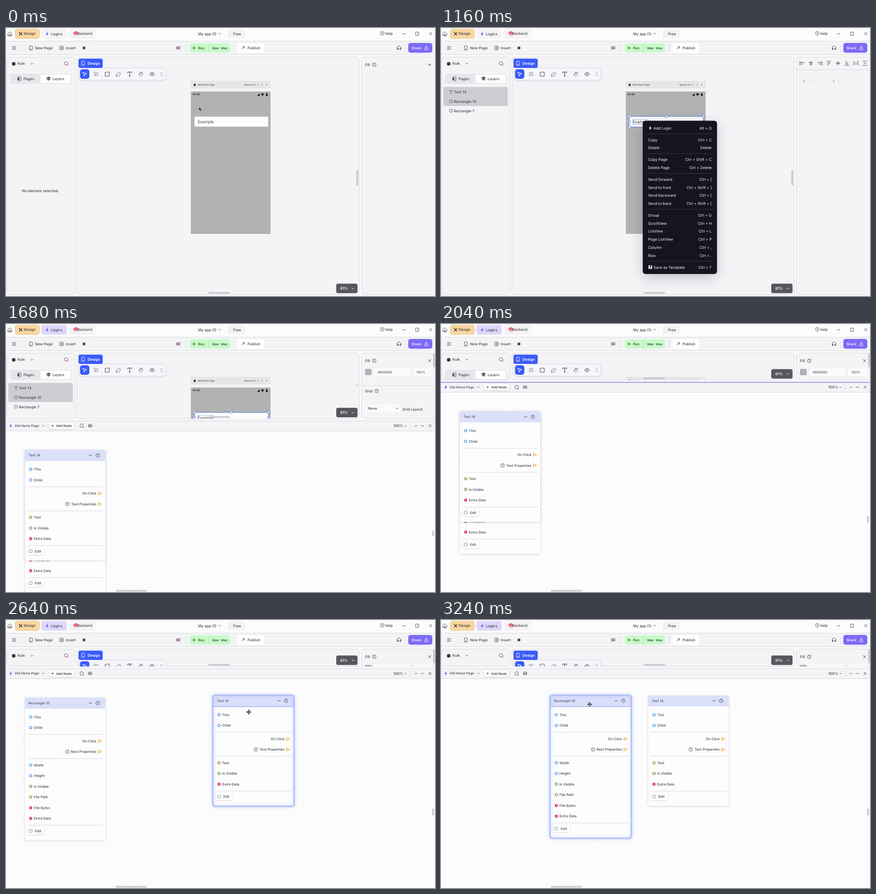
An HTML page for the animation above (3.28 s loop, 947 px wide and 591 px high).

```html
<!DOCTYPE html>
<html lang="en">
<head>
<meta charset="utf-8">
<title>App builder</title>
<style>
html, body { margin: 0; width: 100%; height: 100%; overflow: hidden; background: #fcfcfd; }
svg { display: block; font-family: Inter, "Open Sans", sans-serif; text-rendering: geometricPrecision; }
text { white-space: pre; }
.lift { filter: drop-shadow(0 1px 2px rgba(60, 60, 90, .18)); }
.glow { filter: drop-shadow(0 0 3px rgba(120, 150, 255, .6)); }
.menu { filter: drop-shadow(0 8px 14px rgba(20, 20, 40, .22)); }
</style>
</head>
<body>
<svg id="stage" width="947" height="591" viewBox="0 0 947 591"></svg>
<script>
const LOOP = 3280, STEP = 40;
const INK = '#46464c', BLUE = '#3b5bfb', LINE = '#d2d2d8', PANEL = '#f4f4f7';

// Drawing helpers; text is placed by the middle of its capitals.
const T = (x, y, s, z = 8.1, w = 500, c = INK, a = 'start') =>
  `<text x="${x}" y="${y + z * .364}" font-size="${z}" font-weight="${w}" fill="${c}" text-anchor="${a}">${s}</text>`;
const R = (x, y, w, h, r = 0, f = 'none', s = 'none', sw = 1, more = '') =>
  `<rect x="${x}" y="${y}" width="${w}" height="${h}" rx="${r}" fill="${f}" stroke="${s}" stroke-width="${sw}" ${more}/>`;
const C = (x, y, r, f = 'none', s = 'none', sw = 1) =>
  `<circle cx="${x}" cy="${y}" r="${r}" fill="${f}" stroke="${s}" stroke-width="${sw}"/>`;
const P = (d, s = INK, w = 1, f = 'none') =>
  `<path d="${d}" fill="${f}" stroke="${s}" stroke-width="${w}" stroke-linejoin="round" stroke-linecap="round"/>`;
const G = (id, body, more = '') => `<g id="${id}" ${more}>${body}</g>`;
const at = (x, y, body) => `<g transform="translate(${x} ${y})">${body}</g>`;

// Icons
const help = (x, y) => C(x, y, 4, 'none', INK, .9) + T(x, y, '?', 6, 600, INK, 'middle');
const chevron = (x, y, c = INK, k = 2.3) => P(`M${x - k} ${y - k / 2}l${k} ${k} ${k} ${-k}`, c);
const cross = (x, y, k = 2.8) => P(`M${x - k} ${y - k}l${2 * k} ${2 * k}m0 ${-2 * k}l${-2 * k} ${2 * k}`);
const plus = (x, y, k = 2.8, w = 1) => P(`M${x - k} ${y}h${2 * k}M${x} ${y - k}v${2 * k}`, INK, w);
const search = (x, y) => C(x - .3, y - .3, 3.8, 'none', INK, .9) + P(`M${x + 2.6} ${y + 2.6}l1.8 1.8`);
const bolt = (x, y, c) => P(`M${x + .8} ${y - 4}l-3.6 4.8h2.4l-.6 3.4 3.6-4.8h-2.4z`, c, .4, c);
const phone = (x, y, c = INK) => R(x - 3.2, y - 4.6, 6.4, 9.2, 1.3, 'none', c) + P(`M${x - 1} ${y + 2.8}h2`, c, .8);
const dots = (x, y) => [-2.5, 0, 2.5].map(d => C(x + d, y, .85, INK)).join('');
const bug = (x, y) => P(`M${x - 2} ${y - 2.4}q2-3 4 0v3.4q-2 4.4-4 0zM${x - 4} ${y - 3}l2 1.2M${x + 4} ${y - 3}l-2 1.2M${x - 4.4} ${y}h2.4m4.8 0h2.4M${x - 4} ${y + 3.2}l2-1.4m6 1.4l-2-1.4M${x - 1.5} ${y}h3`, INK, 1);
const vline = (x, y, h) => P(`M${x} ${y}v${h}`, LINE, .9);
const hline = (x, y, w) => P(`M${x} ${y}h${w}`, LINE, .9);

function topBars() {
  return P('M4.5 12l4-4 4 4v5.2h-8zM7.3 17v-3h2.4v3') +
    R(20, 2, 54, 21.5, 5, '#f9d7a3', '#edcb94', .9) +
    P('M29.5 10l5.6 5.4M35.2 9.8l-5.6 5.6M29 9.4l1.6 1.6', '#3a342c', 1.5) + T(39, 12.6, 'Design', 7.9, 500, '#3d362c') +
    R(78, 2, 56, 21.5, 5, PANEL, 'none', 1, 'id="logicsTab"') + bolt(91, 12.8, '#6457f2') + T(99, 12.6, 'Logics') +
    R(138.5, 2, 61, 21.5, 5, PANEL) +
    P('M149 13.3a2.3 2.3 0 0 1 1.4-3.2 4.3 4.3 0 0 1 8 .1 2.2 2.2 0 0 1 .6 3.2z', '#f0607f', .8, '#f0607f') +
    P('M152 14.6v2m3-2v2.6m3-2.6v2', '#f0607f', 1.1) + T(158, 12.6, 'Backend', 7.9) +
    T(424, 12.6, 'My app (1)') + chevron(471.5, 12.6) + R(492, 3.5, 36, 18.5, 5, PANEL) + vline(492, 5, 16) +
    T(510, 12.6, 'Free', 8.1, 500, INK, 'middle') + help(830.3, 11.6) + T(837, 11.6, 'help') +
    P('M875 12.8h6') + R(904, 9, 7, 7, .5, 'none', INK) + cross(937.5, 12.5) +
    // Toolbar
    R(-4, 29, 955, 30, 5, PANEL, LINE, .9) + P('M13.8 41h7.6m-7.6 3h7.6m-7.6 3h7.6') + vline(36, 37, 14) +
    phone(55, 44) + T(64, 44, 'New Page') +
    R(118.5, 40, 8.4, 8, 1.5, 'none', INK) + plus(122.7, 44, 2.2) + T(132, 44, 'Insert') +
    R(169, 41, 6, 6, 0, '#55555b') + bug(380, 44) + vline(397, 37, 14) +
    R(406, 34, 89, 20, 5, '#c8fbc7') + C(415, 44, 3.1, '#62b862') + T(424, 44, 'Run', 7.9) +
    P('M447.5 34.5v19', '#b4ebb4') + T(455, 44.3, 'Web', 6.6, 600) + T(474.5, 44.3, 'Web', 6.6, 600) +
    vline(503, 37, 14) + R(511, 33.5, 59.5, 21, 5, '#fff') + P('M521 46.6l5.4-5.4m-4.2 0h4.2v4.2') + T(533, 44, 'Publish') +
    P('M863.4 46v-2a4.2 4.2 0 0 1 8.4 0v2M864.2 44.5h1.6v3h-1.6zM869.6 44.5h1.6v3h-1.6z') + vline(882, 37, 14) +
    R(888, 33, 53, 21.5, 5, '#7c6af6') + T(895, 44, 'Share', 7.9, 500, '#fff') +
    P('M924.5 43.5v4.6h6.6v-4.6M927.8 46v-6.4m-2 2l2-2 2 2', '#fff', .95);
}

function leftPanel() {
  const box = (y) => R(19, y - 3, 6, 6, 1, 'none', INK, .9);
  return C(17, 79, 4, '#38383c') + T(25, 78.6, 'Nulk', 7.8) + chevron(57, 78.8) + search(133, 78.5) +
    R(8.5, 101, 137, 22, 5, '#e6e6eb') + R(76, 102.5, 67, 19, 4, '#fff') +
    R(26, 107.5, 7, 8.6, 1.2, 'none', INK) + R(25, 110, 5, 4, .5, INK) + T(38.5, 112, 'Pages') +
    P('M89.8 110l4.2-2.3 4.2 2.3-4.2 2.3zM89.8 113l4.2 2.3 4.2-2.3', INK, 1, INK) + T(103, 112, 'Layers') +
    G('empty', T(76, 358.8, 'No element selected.', 8.1, 500, INK, 'middle')) +
    G('layers', R(5, 130, 142.5, 42, 4, '#cdcdd1') +
      P('M19.3 139.6v-1.6h5.4v1.6M22 138v6m-1.2 0h2.4', INK, .8) + T(28.5, 141, 'Text 14') +
      box(161.5) + T(28.5, 161.8, 'Rectangle 10') + box(182.5) + T(28.5, 182.8, 'Rectangle 7'));
}

function designPanel() {
  let grip = '';
  for (let i = 0; i < 6; i++) grip += C(341.7 + i % 2 * 3.6, 98 + (i >> 1) * 3.5, .9, '#a9a9b0');
  const handles = [[416, 195], [497.7, 195], [579.5, 195], [416, 206.7], [579.5, 206.7], [416, 218.5], [497.7, 218.5], [579.5, 218.5]];
  return R(408, 117, 175.5, 15.5, 4, '#e6e6e9', '#dcdce0', .6) +
    P('M414 125l2.6-2.4 2.6 2.4h-.7v2.4h-3.8V125z', '#222', .3, '#222') + T(423, 125, 'Old Home Page', 5.1) +
    T(550.5, 125, 'Nelvon 14', 5.1, 500, INK, 'end') + chevron(555.5, 125, INK, 1.3) +
    [-2, 0, 2].map(d => C(565.5, 125 + d, .55, INK)).join('') + C(575.5, 125, 4.2, '#f6f6f8') + plus(575.5, 125, 1.7, .8) +
    R(408, 140, 176, 314, 0, '#b2b2b3') + T(412, 146.2, '23:24', 5.3, 700, '#111') +
    P('M554.5 149.5l5.3-5.5v5.5z', '#111', .2, '#111') + P('M563 145.6q3.3-2.6 6.6 0l-3.3 4.2z', '#111', .2, '#111') +
    R(574, 144.6, 3.4, 5.3, .6, '#111') + R(575, 143.8, 1.4, 1, 0, '#111') +
    R(416, 195.5, 162.8, 22, 0, '#fdfdfe') +
    `<text x="423.4" y="210.4" font-size="9.2" font-weight="400" fill="#4a4a50" font-family="Roboto, sans-serif">Example</text>` +
    G('marquee', R(419.5, 170.5, 1, 1, 0, 'rgba(80,120,240,.16)', '#4a62d6', .9, 'id="marqueeBox"')) +
    G('picked', R(416, 195, 163.5, 23.5, 0, 'none', '#4b79d8', .9) + R(423, 201.8, 35, 10.6, 0, 'none', '#6f8fd8', .7) +
      handles.map(([x, y]) => R(x - 2.4, y - 2.4, 4.8, 4.8, .5, '#fff', '#3f78e0', .9)).join('')) +
    R(160, 67.5, 53.5, 20.5, 4, BLUE) + phone(170, 77.8, '#fff') + T(180, 77.8, 'Design', 8.1, 600, '#fff') +
    `<g class="lift">${R(162, 88.5, 190.5, 26, 6, '#f6f6fa', '#dddde6', .8)}</g>` +
    R(163.5, 91, 20.5, 21, 5, BLUE) + P('M169.8 97.6l8 3-3.5 1.5-1.4 3.6z', '#fff', 1.1) +
    P('M196.6 96.5v10m4.6-10v10m-7.4-7.3h10m-10 4.6h10', '#8c8c94', .9) + R(219, 97.2, 9, 9, 1, 'none', INK, 1.1) +
    P('M243 106.3l1.6-6 4.4-1.7 3 3-1.7 4.2zM249 98.4l1.6-1.6 3.4 3.4-1.6 1.6M243.2 106l3.4-3.4', '#74747b', .9) +
    P('M268.6 99v-1.8h8.8V99M273 97.2v9m-1.5 0h3', INK, 1.2) +
    P('M295 103v-4.6q.9-.9 1.6 0v-1.6q.9-.9 1.7 0v.7q.9-.8 1.7 0v1q.9-.8 1.6 0v4.6q-.7 3.4-3.8 3.4-2.6 0-5-4.6.8-1 2.2.6zM296.6 98.6v2.6m1.7-3.6v3.4m1.7-2.6v2.8', '#6c6c73', .8) +
    P('M317 101.5q5.5-8 11 0-5.5 8-11 0z', INK, 1) + C(322.5, 101.5, 1.8, 'none', INK, 1) + grip;
}

function rightPanel() {
  const align = [797, 816.5, 836.5, 856, 876.5, 896, 916, 936].map((x, i) => {
    const bars = [
      'M-4.5-4.5v9M-2.5-1.7h7M-2.5 1.7h4', 'M0-4.5v9M-4-1.7h8M-2.6 1.7h5.2', 'M4.5-4.5v9M2.5-1.7h-7M2.5 1.7h-4',
      'M-4.5-4.5h9M-1.7-2.5v7M1.7-2.5v4', 'M-4.5 0h9M-1.7-4v8M1.7-2.6v5.2', 'M-4.5 4.5h9M-1.7 2.5v-7M1.7 2.5v-4',
      'M-4.5-4.5v9M4.5-4.5v9M0-2.5v5', 'M-4.5-4.5h9M-4.5 4.5h9M-2.5 0h5'];
    return at(x, 77.8, P(bars[i], INK, 1.1));
  }).join('');
  const fill = T(792.5, 81, 'Fill') + help(812.8, 81);
  const pale = '#9a9aa2';
  return G('fillAdd', fill + plus(935, 81)) +
    G('aligns', align + hline(785, 92, 162) + T(798, 118, 'X', 8, 500, pale) + T(811.5, 118, '--', 8, 400, pale) +
      T(864, 118, 'Y', 8, 500, pale) + T(876.5, 118, '--', 8, 400, pale)) +
    G('pageProps', fill + cross(935, 81) + R(792.5, 99, 14.5, 14, 2, '#b1b1b6') +
      R(813.5, 98, 78, 16.5, 3, '#fbfbfd') + T(820.5, 106.2, '#B5B5B5', 7.4, 400) +
      R(899, 98, 40.5, 16.5, 3, '#fbfbfd') + T(906, 106.2, '100%', 7.4, 400) + hline(785, 136, 162) +
      T(792.5, 147.6, 'Grid') + help(818, 147.6) + R(793, 178, 78, 17.5, 3, '#fbfbfd') +
      T(798.5, 186.4, 'None') + chevron(863, 186.4) + T(875, 188, 'Grid Layout') + R(943, 64.5, 3.6, 31, 1.5, '#c6c6cb'));
}

function menu() {
  const groups = [
    [['Add Logic', 'Alt + Q']],
    [['Copy', 'Ctrl + C'], ['Delete', 'Delete']],
    [['Copy Page', 'Ctrl + Shift + C'], ['Delete Page', 'Ctrl + Delete']],
    [['Send forward', 'Ctrl + ]'], ['Send to front', 'Ctrl + Shift + ]'], ['Send backward', 'Ctrl + ['], ['Send to back', 'Ctrl + Shift + [']],
    [['Group', 'Ctrl + G'], ['ScrollView', 'Ctrl + H'], ['ListView', 'Ctrl + L'], ['Page ListView', 'Ctrl + P'], ['Column', 'Ctrl + ,'], ['Row', 'Ctrl + .']],
    [['Save as Template', 'Ctrl + T']]];
  let y = 220.5, out = `<g class="menu">${R(445.3, 204.5, 164, 338, 6, '#15151f')}</g>`;
  groups.forEach((rows, i) => {
    const iconed = i === 0 || i === 5;
    rows.forEach(([name, keys]) => {
      out += T(iconed ? 469 : 457, y, name, 8.35, 400, '#f3f3f6') + T(597.5, y, keys, 8.35, 400, '#f3f3f6', 'end');
      y += 17.7;
    });
    if (i < 5) out += P(`M452 ${y - 4.9}h150`, '#43434d', .8);
    y += 8.3;
  });
  return out + bolt(462, 220.5, '#fff') + R(458, 523.3, 8, 8, 1.2, '#f3f3f6') + R(460, 524.3, 4, 2.2, 0, '#15151f') + C(462, 529, 1.2, '#15151f');
}

const PORT = { blue: '#2f8be0', olive: '#8a7d1e', green: '#568a22' };
const port = (x, y, kind) => kind === 'red' ? C(x, y, 2.7, '#f58ca0', '#cf1f45', 1.3) : C(x, y, 2.7, '#fff', PORT[kind], 1.2);
const cardHeight = n => 173 + 23.5 * n;

function card(id, title, kind, rows) {
  const h = cardHeight(rows.length), foot = h - 20.5;
  const arrow = y => P(`M162.5 ${y - 3.2}l7 3.2-7 3.2z`, '#eda322', 1.2);
  const label = (y, s) => T(158, y, s, 7.65, 500, INK, 'end') + arrow(y);
  const item = (y, s, k) => port(13, y, k) + T(20, y, s, 7.65);
  return G(id,
    `<g class="lift">${R(0, 0, 178, h, 4, '#fdfdfe', '#ebebf2', .8, `id="${id}Body"`)}</g>` +
    P('M0 24V4q0-4 4-4h170q4 0 4 4v20z', 'none', 0, '#dadffa') +
    G(id + 'Ring', `<g class="glow">${R(-.8, -.8, 179.6, h + 1.6, 5, 'none', '#a9bdfa', 2.6)}</g>` + P('M0 24.6h178', '#b3bff7', 2)) +
    T(8, 11.7, title, 7.65, 500, '#55586a') + dots(145.3, 11.7) + help(161, 11.7) +
    item(42.5, 'This', 'blue') + item(66, 'Child', 'blue') + hline(6, 81, 166.5) + label(95.5, 'On Click') +
    help(94.2, 119) + label(119, kind + ' Properties') + hline(6, 134, 166.5) +
    rows.map(([s, k], i) => item(148.5 + 23.5 * i, s, k)).join('') + hline(6, foot - 12.5, 166.5) +
    `<g class="lift">${R(5, foot - 7.5, 38, 15, 4, '#fff')}</g>` +
    R(9.6, foot - 3.4, 6.8, 6.8, 2.4, 'none', '#77777f', .9) + T(22.5, foot, 'Edit', 7.65));
}

function logicPanel() {
  return R(0, 0, 947, 591, 0, '#fcfcfd') + R(0, 22.5, 947, 570, 0, 'url(#grid)') +
    R(-3, .5, 953, 22.3, 3, PANEL, LINE, .9) + G('divider', R(0, 0, 947, 1.6, 0, '#8b79d6')) +
    bolt(10.5, 11.4, '#6457f2') + T(19, 11.3, 'Old Home Page', 7.3) + chevron(82.3, 11.6, INK, 1.9) +
    `<g class="lift">${R(95.5, 4.3, 54, 14, 3, '#fdfdfe')}</g>` + plus(103, 11.5, 2.2) + T(110.8, 11.5, 'Add Node', 7.2, 600) +
    search(167.3, 11.5) + bug(185.5, 11.5) + T(855, 11.5, '100%', 8) + chevron(882, 11.7, INK, 2) + vline(892, 5, 13) +
    P('M902.8 12.6l2.2-2.2 2.2 2.2') + dots(919, 11.5) + cross(936, 11.5, 2.6) +
    card('rectCard', 'Rectangle 10', 'Rect', [['Width', 'blue'], ['Height', 'blue'], ['Is Visible', 'green'],
      ['File Path', 'olive'], ['File Bytes', 'red'], ['Extra Data', 'red']]) +
    card('textCard', 'Text 14', 'Text', [['Text', 'olive'], ['Is Visible', 'green'], ['Extra Data', 'red']]);
}

document.getElementById('stage').innerHTML =
  `<defs><clipPath id="cut"><rect id="cutBox" x="0" y="63" width="947" height="525"/></clipPath>
  <pattern id="grid" x="5" y="36" width="21.7" height="22" patternUnits="userSpaceOnUse">${C(2, 2, .85, '#dedeee')}</pattern></defs>` +
  R(0, 0, 947, 591, 0, '#fcfcfd') + topBars() +
  [[1, 151], [156.5, 623], [784.5, 170]].map(([x, w]) => R(x, 64, w, 524, 5, PANEL, LINE, .9, 'class="pane"')).join('') +
  G('panes', leftPanel() + designPanel() + rightPanel(), 'clip-path="url(#cut)"') +
  R(773.4, 313, 4, 34, 1.5, '#c9c9cf', 'none', 1, 'id="vThumb"') +
  G('foot', R(447, -5.8, 47.5, 3.8, 1.5, '#c9c9cf') + R(729, -24.2, 47, 21, 4, '#57575e') +
    T(738, -13.6, '61%', 8, 600, '#fff') + chevron(766, -13.4, '#fff')) +
  G('menu', menu()) +
  G('logic', logicPanel()) +
  G('scrolls', R(242.5, 586.2, 68.5, 4, 1.5, '#cfcfd2') + R(940.5, 0, 4.5, 12, 1.5, '#cfcfd2', 'none', 1, 'id="logicThumb"')) +
  G('arrow', P('M0 0l.2 7.6 1.9-1.7 1.5 3 1.5-.7-1.5-2.9 2.5-.3z', '#f4f4f4', .4, '#1d1d20') +
    R(5.5, 6.8, 6, 4.4, .6, 'none', '#8f8f94', .8, 'stroke-dasharray="1.2 .9"')) +
  G('mover', P('M-4.4 0h8.8M0-4.4v8.8M-3-1.5L-4.6 0-3 1.5M3-1.5L4.6 0 3 1.5M-1.5-3L0-4.6 1.5-3M-1.5 3L0 4.6 1.5 3', '#fff', 2.6) +
    P('M-4.4 0h8.8M0-4.4v8.8M-3-1.5L-4.6 0-3 1.5M3-1.5L4.6 0 3 1.5M-1.5-3L0-4.6 1.5-3M-1.5 3L0 4.6 1.5 3', '#3a3a40', 1.3));

const $ = id => document.getElementById(id);
const show = (id, on) => $(id).style.display = on ? '' : 'none';
const move = (id, x, y) => $(id).setAttribute('transform', `translate(${x} ${y})`);
const set = (el, attrs) => { for (const k in attrs) el.setAttribute(k, attrs[k]); };
const clamp = v => Math.max(0, Math.min(1, v));
const ramp = (t, a, b) => clamp((t - a) / (b - a));
const ease = v => v * v * (3 - 2 * v);
const panes = document.querySelectorAll('.pane');

// Point on a polyline of [time, x, y] stops, eased between them.
function path(t, stops) {
  let i = 0;
  while (i < stops.length - 2 && t >= stops[i + 1][0]) i++;
  const [a, b] = [stops[i], stops[i + 1]], k = ease(ramp(t, a[0], b[0]));
  return [a[1] + (b[1] - a[1]) * k, a[2] + (b[2] - a[2]) * k];
}

const SELECT = 480, MENU = 1000, CLICK = 1320, OPEN = 1400;
const GRAB_TEXT = 2240, GRAB_RECT = 2880;

function draw(t) {
  const open = t >= OPEN;
  const top = 213 - 106.5 * ramp(t, 1720, 2120);
  const bottom = open ? top - 4 : 588, tall = bottom - 64;

  // Layout
  panes.forEach(p => p.setAttribute('height', tall));
  $('cutBox').setAttribute('height', tall + 1);
  move('foot', 0, bottom);
  const thumb = 34 * (tall / 524) ** 2;
  set($('vThumb'), { y: 330 - (588 - bottom) * .517 - thumb / 2, height: thumb });
  $('logicsTab').setAttribute('fill', open ? '#ddd7fa' : PANEL);

  // Selection
  const selected = t >= SELECT;
  show('empty', !selected);
  show('layers', selected);
  show('picked', selected);
  show('fillAdd', !selected);
  show('aligns', selected && !open);
  show('pageProps', open);
  show('menu', t >= MENU && t < CLICK);
  const drag = ramp(t, 160, 640);
  show('marquee', t > 160 && t <= 720);
  set($('marqueeBox'), { width: 50.5 * drag, height: 49.5 * drag });

  // Logic editor
  show('logic', open);
  show('scrolls', open);
  move('logic', 0, top);
  show('divider', t >= 1720 && t < 2120);
  const space = 591 - top - 22.5, bar = space * .034;
  set($('logicThumb'), { y: top + 22.5 + space * .637 - bar / 2, height: bar });
  const grown = 24 + Math.max(0, t - 1520) * 1.95;
  $('textCardBody').setAttribute('height', Math.min(grown, cardHeight(3)));
  $('rectCardBody').setAttribute('height', Math.min(grown, cardHeight(6)));
  const a = ease(ramp(t, GRAB_TEXT, 2600)), b = ease(ramp(t, GRAB_RECT, 3200));
  move('textCard', 41.5 + 415.7 * a, 65 - 5 * a);
  move('rectCard', 41.5 + 200 * b, 65 - 5 * b);
  show('textCardRing', t >= GRAB_TEXT && t < GRAB_RECT);
  show('rectCardRing', t >= GRAB_RECT);

  // Pointers
  show('arrow', t < MENU);
  const tip = t >= 160 && t <= 640 ? [420 + 51.5 * drag, 171 + 50.5 * drag]
    : path(t, [[0, 426, 174.5], [160, 420, 171], [640, 471.5, 221.5], [720, 471.5, 221.5], [960, 446, 205]]);
  move('arrow', ...tip);
  show('mover', t >= 2160);
  move('mover', ...path(t, [[2120, 150, 150], [GRAB_TEXT, 120.3, 208], [2600, 536, 203], [2680, 536, 203],
    [2840, 128, 191], [GRAB_RECT, 128, 191], [3200, 328, 186]]));
}

function tick() {
  draw(Math.floor(performance.now() % LOOP / STEP) * STEP);
  requestAnimationFrame(tick);
}
tick();
</script>
</body>
</html>
```
